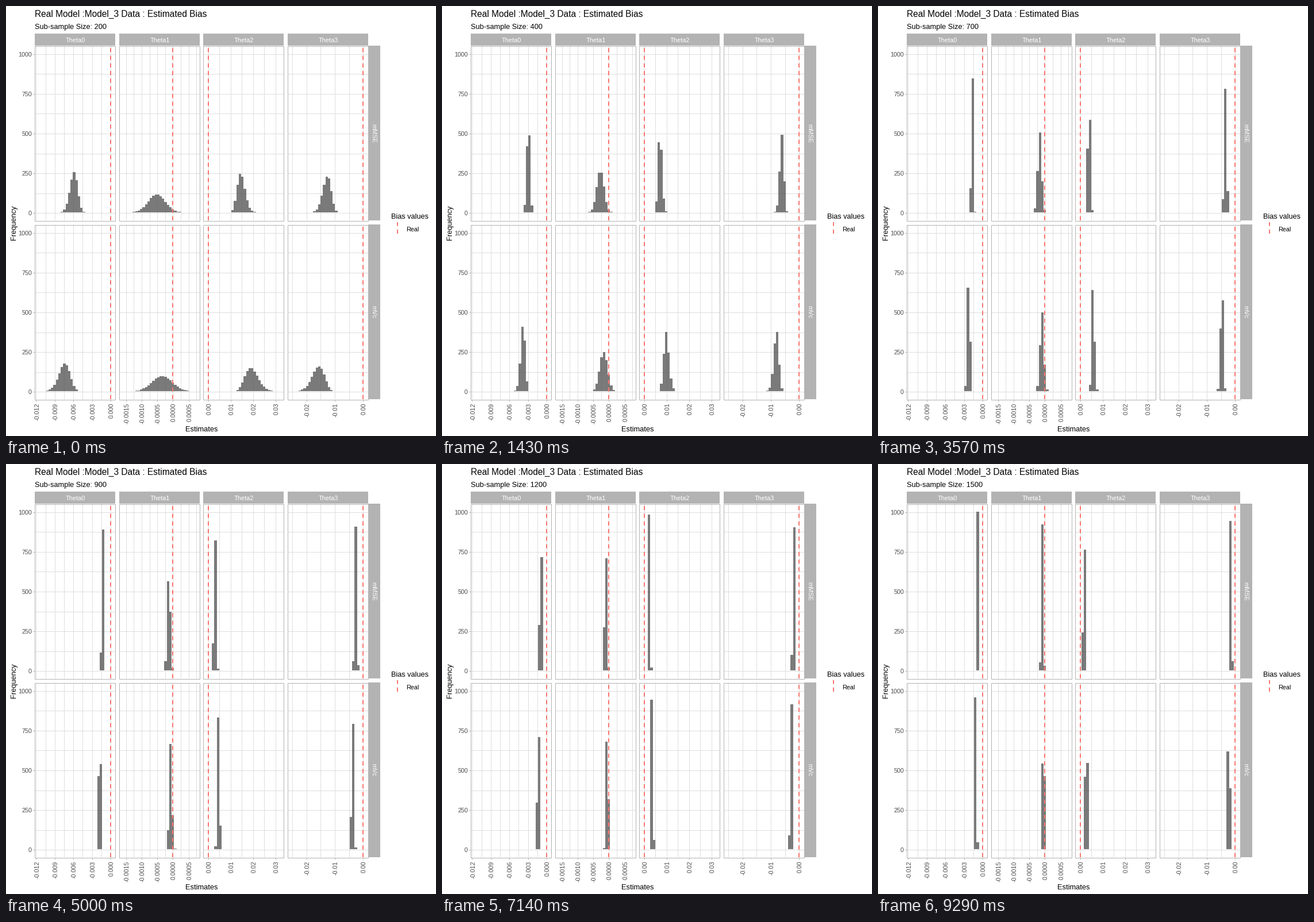
A matplotlib script for the animation above (10 s loop, 748x748 px).

```python
import math

import matplotlib.pyplot as plt
from matplotlib.animation import FuncAnimation
from matplotlib.patches import Polygon, Rectangle

plt.rcParams["font.family"] = "Liberation Sans"

STAGE = 748
PT = 0.72                      # points per pixel at 100 dpi
GRID, EDGE, RED, INK = "#dedede", "#b3b3b3", "#f8766d", "#4d4d4d"
BIN = 4.237                    # bin width in pixels
PANEL_W, PANEL_H = 140, 304
COUNT_H = PANEL_H / 1100       # pixels per count
ROWS = {"mMSE": 69, "mVc": 380}

# left edge, zero position, side of the bias, tick unit, label format,
# pixels per tick, first and last tick
COLS = {
    "Theta0": (50, 182.0, -1, 0.003, "%.3f", 32.4, -4, 0),
    "Theta1": (197, 290.3, -1, 0.0005, "%.4f", 27.2, -3, 1),
    "Theta2": (343, 351.9, 1, 0.01, "%.2f", 39.0, 0, 3),
    "Theta3": (490, 621.2, -1, 0.01, "%.2f", 49.3, -2, 0),
}

# Bias and its spread shrink as powers of the sample size:
# bias in bins at size 300, its power, spread at size 300, its power
DECAY = {
    ("mMSE", "Theta0"): (10.0, 1.022, 0.089, 0.36),
    ("mVc", "Theta0"): (12.87, 0.962, 0.102, 0.41),
    ("mMSE", "Theta1"): (4.55, 0.918, 2.11, 1.25),
    ("mVc", "Theta1"): (2.85, 1.05, 2.35, 1.39),
    ("mMSE", "Theta2"): (8.78, 1.055, 0.114, 0.10),
    ("mVc", "Theta2"): (12.0, 0.97, 0.129, 0.42),
    ("mMSE", "Theta3"): (9.65, 1.065, 0.111, 0.10),
    ("mVc", "Theta3"): (12.4, 0.983, 0.118, 0.36),
}

SIZES = range(200, 1501, 100)
TICKS = 100                    # drawn frames per loop


def share_below(edge, bias, spread, symmetric):
    """Normal where the bias straddles zero, log-normal elsewhere."""
    if symmetric:
        z = (edge - bias) / spread
    elif edge <= 0:
        return 0.0
    else:
        z = math.log(edge / bias) / spread
    return 0.5 * (1 + math.erf(z / math.sqrt(2)))


def histogram(key, size):
    """Pairs of signed bin number and count out of 1000, left to right."""
    bias, bias_pow, spread, spread_pow = DECAY[key]
    bias *= (300 / size) ** bias_pow
    spread *= (300 / size) ** spread_pow
    symmetric = key[1] == "Theta1"
    side = COLS[key[1]][2]
    pairs = []
    for k in range(-9, 30):
        low, high = (share_below(k + h, bias, spread, symmetric)
                     for h in (-0.5, 0.5))
        count = round(1000 * (high - low))
        if count > 0:
            pairs.append((side * k, count))
    return sorted(pairs)


def count_y(row, count):
    return round(ROWS[row] + PANEL_H - (count + 50) * COUNT_H)


def outline(key, size):
    row, col = key
    zero = COLS[col][1]
    base = count_y(row, 0)
    points = []
    for k, count in histogram(key, size):
        left, right = (round(zero + (k + h) * BIN) for h in (-0.5, 0.5))
        top = count_y(row, count)
        points += [(left, base), (left, top), (right, top), (right, base)]
    return points


fig = plt.figure(figsize=(7.48, 7.48), dpi=100, facecolor="white")
ax = fig.add_axes([0, 0, 1, 1])
ax.set_xlim(0, STAGE)
ax.set_ylim(STAGE, 0)
ax.axis("off")


def line(x0, y0, x1, y1, color, width=1, z=1, **kw):
    ax.plot([x0, x1], [y0, y1], color=color, lw=width * PT, zorder=z,
            solid_capstyle="butt", **kw)


def vline(x, y0, y1, color):
    x = round(x) + 0.5
    line(x, y0, x, y1, color)


def hline(y, x0, x1, color):
    line(x0, y + 0.5, x1, y + 0.5, color)


def dashed(x, bottom, top):
    line(x, bottom, x, top, RED, width=2, z=3, linestyle=(0, (3.65, 3)))


def text(x, y, s, px, color="black", ha="left", rotation=0):
    return ax.text(x, y, s, fontsize=px * PT, color=color, ha=ha, va="baseline",
                   rotation=rotation, rotation_mode="anchor", zorder=5)


def strip(x, y, w, h):
    ax.add_patch(Rectangle((x, y), w, h, fc=EDGE, lw=0, zorder=1))


def draw_panel(row, col):
    left, zero, _, _, _, step, first, last = COLS[col]
    top = ROWS[row]
    right, bottom = left + PANEL_W, top + PANEL_H
    for i in range(2 * first - 2, 2 * last + 3):
        x = zero + i * step / 2
        if left < x < right:
            vline(x, top, bottom, GRID)
    for count in range(0, 1001, 125):
        hline(count_y(row, count), left, right, GRID)
    dashed(round(zero), bottom, top)
    ax.add_patch(Rectangle((left + 0.5, top + 0.5), PANEL_W, PANEL_H, fill=False,
                           ec=EDGE, lw=PT, zorder=4))
    return ax.add_patch(Polygon([(0, 0)], closed=True, fc="#595959", alpha=0.8,
                                lw=0, antialiased=False, zorder=2))


bars = {key: draw_panel(*key) for key in DECAY}

for name, (left, zero, _, unit, fmt, step, first, last) in COLS.items():
    strip(left, 48, PANEL_W, 21)
    text(left + PANEL_W / 2 + 0.5, 63, name, 11, "white", "center")
    for i in range(first, last + 1):
        x = zero + i * step
        vline(x, 685, 688, EDGE)
        text(x + 4.7, 690.5, fmt % (i * unit), 10.8, INK, "right", 90)

for name, top in ROWS.items():
    strip(630, top, 21, PANEL_H)
    text(636, top + PANEL_H / 2, name, 11, "white", "center", 270)
    for count in range(0, 1001, 250):
        y = count_y(name, count)
        hline(y, 47, 50, EDGE)
        text(45, y + 5, str(count), 10.8, INK, "right")

text(50, 19, "Real Model :Model_3 Data : Estimated Bias", 15.55)
subtitle = text(50, 40, "", 12.8)
text(340, 740, "Estimates", 12.9, ha="center")
text(17, 376.5, "Frequency", 12.7, ha="center", rotation=90)
text(670, 370, "Bias values", 12.8)
text(696, 391.5, "Real", 10.8)
dashed(681, 396, 376)


def update(frame):
    # Equal shares of the loop, each starting on the tick before its due time
    size = SIZES[int((frame + 0.9) * len(SIZES) / TICKS)]
    subtitle.set_text(f"Sub-sample Size: {size}")
    for key, patch in bars.items():
        patch.set_xy(outline(key, size))
    return [subtitle, *bars.values()]


anim = FuncAnimation(fig, update, frames=TICKS, interval=10000 // TICKS,
                     repeat=True, repeat_delay=0, blit=False)
plt.show()
```
